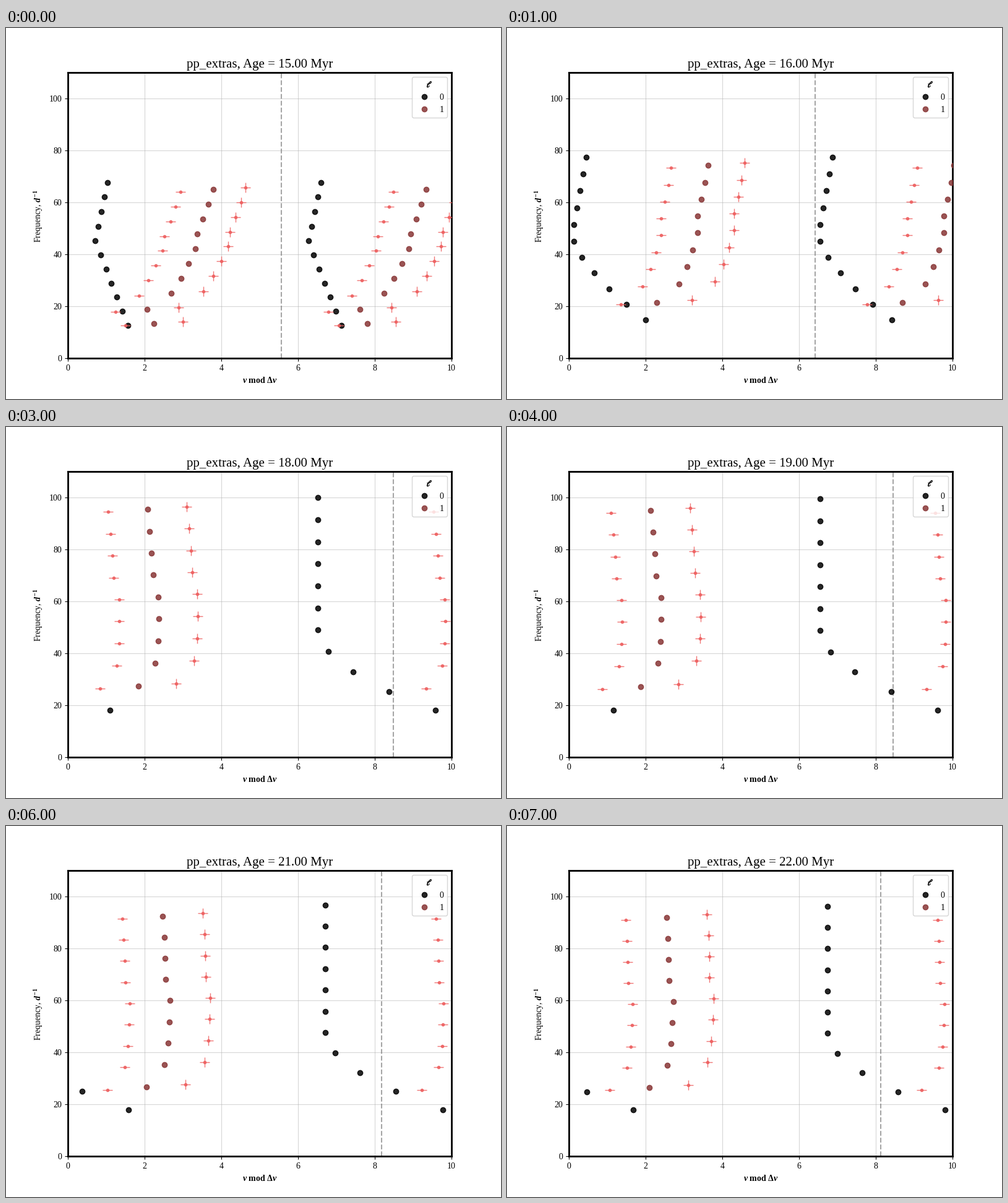
These frames come from a looping animation (800 by 600 pixels, 8 s). A matplotlib script:

```python
import matplotlib.pyplot as plt
import numpy as np
from matplotlib import patheffects
from matplotlib.animation import FuncAnimation
from matplotlib.patches import FancyBboxPatch

SERIF = "Liberation Serif"
plt.rcParams.update({
    "font.family": SERIF,
    "font.size": 10,
    "mathtext.fontset": "custom",
    "mathtext.rm": SERIF,
    "mathtext.it": SERIF + ":italic",
    "mathtext.bf": SERIF + ":bold",
    "mathtext.bfit": SERIF + ":italic:bold",
})

SCALE = 62  # key values per d^-1
BLACK, BROWN, PINK = "#000000", "#893636", "#ee6060"

# Key values at 15, 16, 17 and 18 Myr, then the limit at old age
SEPARATION = 344.6, 397.9, 484, 526.3, 500
SPLITTING = 52.9, 59.4, 63, 63.5, 66.2
DIPOLE_MID = 206, 208, 164, 146, 172.5
DIPOLE_SLOPE = 10.5, 7.5, 0.8, -1, 0.9
RADIAL_BASE = 44, 8, -85, -122, -80
RADIAL_HOOK = 53, 116, 179, 190, 190
RADIAL_BEND = 2, 1, 0.2, 0, 0


def phase(step):
    """Key position: one key per step, then a slow approach to the limit."""
    t = max(step - 3, 0) ** 2.8
    return min(step, 3) + t / (t + 2.15 ** 2.8)


def radial_offset(k, base, hook, bend):
    """Hook at low order, flat middle and a tail rising at high order."""
    j = k - 2
    low = np.clip(1 - j / (4 + bend), 0, 1) ** (1.75 - 0.375 * bend)
    return base + hook * low + 5 * min(bend, 1) * np.clip(j - 6, 0, None)


def dipole_offset(k, mid, slope):
    """Parabola with a dip at order 3 and a small glitch above order 7."""
    j = k - 7
    dip = 30 * np.exp(-2 * np.abs(k - 3))
    return mid + slope * j - 0.4 * j ** 2 - dip - 7 * (k > 7)


def modes(step):
    """Separation and the frequencies of l=0, l=1, and its m=-1, m=+1."""
    def key(values):
        return np.interp(phase(step), range(5), values)

    sep = key(SEPARATION)
    k = np.arange(2, 13)
    radial = k * sep + radial_offset(
        k, key(RADIAL_BASE), key(RADIAL_HOOK), key(RADIAL_BEND))
    k = np.arange(3 if step else 2, 12)
    dipole = k * sep + dipole_offset(k, key(DIPOLE_MID), key(DIPOLE_SLOPE))
    split = key(SPLITTING) * (1 - 1 / k ** 3)
    series = radial, dipole, dipole - split, dipole + split
    return sep / SCALE, [s / SCALE for s in series]


fig, ax = plt.subplots(figsize=(8, 6), dpi=100)
ax.set(xlim=(0, 10), ylim=(0, 110))
ax.set_axisbelow(True)
ax.grid(color="#b0b0b0", alpha=0.5, lw=0.8)
for spine in ax.spines.values():
    spine.set_linewidth(2)

# Overlay in pixel coordinates for labels and legend
top = fig.add_axes([0, 0, 1, 1], zorder=5)
top.set(xlim=(0, 800), ylim=(600, 0))
top.axis("off")


def label(x, y, text, **kw):
    return top.text(x, y, text, va="baseline", **kw)


def dots(axes, color, x=(), y=()):
    return axes.plot(x, y, "o", color=color, ms=6, mew=1, alpha=0.85, zorder=3)[0]


def pink(marker, size):
    return ax.plot([], [], marker, color=PINK, ms=size, mew=1, alpha=0.85,
                   ls="none", zorder=4)[0]


label(410, 574, r"$\mathbfit{\nu}$ mod $\mathbf{\Delta}\mathbfit{\nu}$",
      ha="center", weight="bold")
label(57, 304, r"Frequency, $\mathbfit{d}^{\,\mathbf{-1}}$",
      ha="center", rotation=90, rotation_mode="anchor")

top.add_patch(FancyBboxPatch(
    (656.5, 79.5), 57, 66, boxstyle="round,pad=0,rounding_size=2.8",
    fc="white", ec="0.8", lw=1, alpha=0.8))
ell = label(684.5, 96, r"$\ell$", ha="center", math_fontfamily="stix")
ell.set_path_effects([patheffects.withStroke(linewidth=0.4, foreground="black")])
for y, color, name in [(111, BLACK, "0"), (131, BROWN, "1")]:
    dots(top, color, [676], [y])
    label(700.5, y + 4.8, name)

fold = ax.axvline(5, color="gray", alpha=0.7, ls="--", lw=1.5, zorder=2)
groups = [
    [dots(ax, BLACK)],
    [dots(ax, BROWN)],
    [pink(".", 6), pink("_", 11.4)],
    [pink(".", 6), pink("+", 11.4)],
]
title = ax.set_title("", fontsize=15)


def update(step):
    sep, series = modes(step)
    fold.set_xdata([sep, sep])
    for lines, nu in zip(groups, series):
        x = nu % sep
        for line in lines:
            line.set_data(np.append(x, x + sep), np.append(nu, nu))
    title.set_text(f"pp_extras, Age = {15 + step:.2f} Myr")


anim = FuncAnimation(fig, update, frames=8, interval=1000,
                     init_func=lambda: update(0), repeat=True, repeat_delay=0)
plt.show()
```
